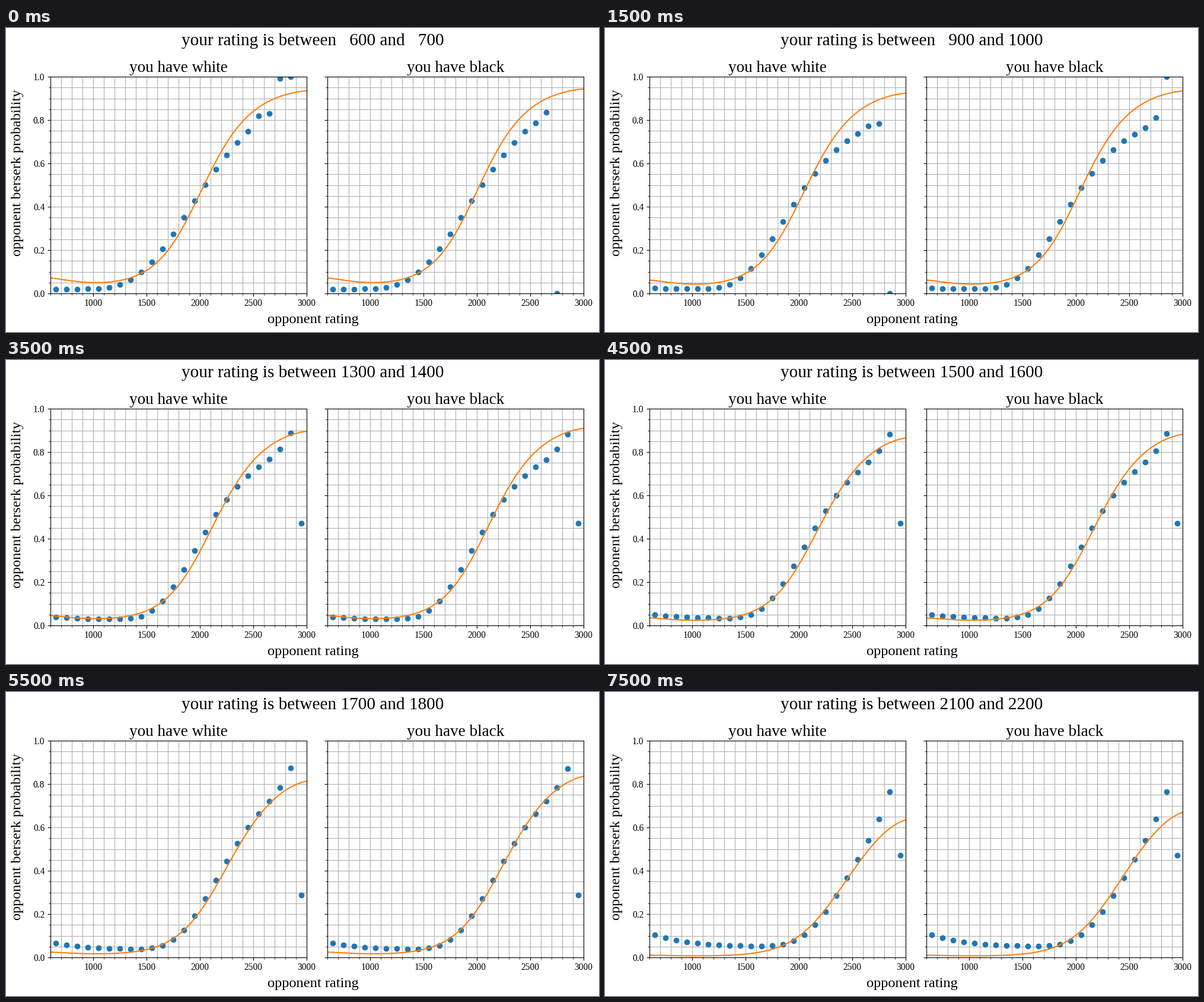
These frames come from a looping animation (1000x512 px, 8 s). A matplotlib script:

```python
import numpy as np
import matplotlib.pyplot as plt
from matplotlib.animation import FuncAnimation
from matplotlib.ticker import MultipleLocator

W, H, DPI = 1000, 512, 100
FRAMES = 16

plt.rcParams["font.family"] = "Liberation Serif"

BINS = np.arange(650, 3000, 100)
CURVE_X = np.linspace(600, 3000, 241)

# Log-odds of the fitted curve at a few ratings, smoothed by a polynomial.
KNOT_X = np.array([600, 1100, 1350, 1650, 2000, 2300, 2650, 3000])
KNOT_Y = [-2.57, -2.93, -2.55, -1.60, -.15, 1.00, 2.07, 2.66]
SHAPE = np.polyfit((KNOT_X - 1800) / 1200, KNOT_Y, 6)


def curve(step, black):
    """Fitted probability: one shape, lowered ever faster by the own rating."""
    t = (CURVE_X - 1800) / 1200
    drop = .147 * step + .4 * np.log(np.cosh(step / 4 - 2) / np.cosh(2))
    z = np.polyval(SHAPE, t) - drop * (.97 + .03 * t)
    if black:
        z = z + .155 * ((CURVE_X - 900) / 2100) ** 2
    return 1 / (1 + np.exp(-z))


def dots(step, black):
    """Measured probability: a low floor plus a Gompertz rise."""
    u = step / 15
    start = np.exp(-step)
    floor = .02 + u ** 2 * (.03 + .055 * np.exp((650 - BINS) / 300))
    top = .83 + .17 * u ** 4 + .17 * start
    mid = 1830 + 680 * u ** 2.4 + 70 * start
    width = 350 + 80 * (2 * u - 1) ** 2 + 50 * start
    y = floor + top * np.exp(-np.exp((mid - BINS) / width))

    # Strong opponents are rare, so the right end is higher and noisier.
    rare = np.clip((BINS - 2450) / 400, 0, 1)
    rng = np.random.default_rng(10 * step + black)
    y += .08 * rare ** 4 + .1 * np.exp(-step / 2) * rare * rng.normal(size=BINS.size)

    # The last bin holds a single game at first, later a handful of games.
    last = min(23, 21 + (step + 4 - black) // 4)
    if step < 7:
        y[last] = (step + black + 1) % 2
    else:
        y[last] = .38 + .13 * np.cos(np.pi * step / 4)
    y[last + 1:] = np.nan
    return y


def label(x, y, text, px, **kw):
    return fig.text(x / W, 1 - y / H, text, fontsize=px * 72 / DPI,
                    ha="center", va="baseline", **kw)


def panel(left, show_y):
    ax = fig.add_axes([left / W, 1 - 447 / H, 432 / W, 365 / H])
    ax.set(xlim=(600, 3000), ylim=(0, 1))
    ax.xaxis.set_major_locator(MultipleLocator(500))
    ax.xaxis.set_minor_locator(MultipleLocator(100))
    ax.yaxis.set_major_locator(MultipleLocator(.2))
    ax.yaxis.set_minor_locator(MultipleLocator(.05))
    ax.tick_params(labelsize=11.2, labelleft=show_y)
    ax.tick_params(axis="x", pad=2.7)
    ax.grid(which="both", color="#b0b0b0", linewidth=.8)
    points, = ax.plot([], [], "o", color="#1f77b4")
    line, = ax.plot([], [], color="#ff7f0e", linewidth=1.5)
    return points, line


fig = plt.figure(figsize=(W / DPI, H / DPI), dpi=DPI, facecolor="white")
panels = [panel(75, True), panel(542, False)]
title = label(517, 29, "", 29.2)
label(290.5, 74, "you have white", 27.1)
label(758.5, 74, "you have black", 27.1)
label(517.5, 497, "opponent rating", 24.4)
label(25.5, 243.5, "opponent berserk probability", 24.2,
      rotation=90, rotation_mode="anchor")


def padded(n):
    # two spaces are as wide as one digit
    return str(n) if n >= 1000 else "  " + str(n)


def update(step):
    low = 600 + 100 * step
    title.set_text(f"your rating is between {padded(low)} and {padded(low + 100)}")
    for black, (points, line) in enumerate(panels):
        points.set_data(BINS, dots(step, black))
        line.set_data(CURVE_X, curve(step, black))
    return []


anim = FuncAnimation(fig, update, frames=FRAMES, interval=500,
                     init_func=lambda: update(0), repeat=True, repeat_delay=0)
plt.show()
```
